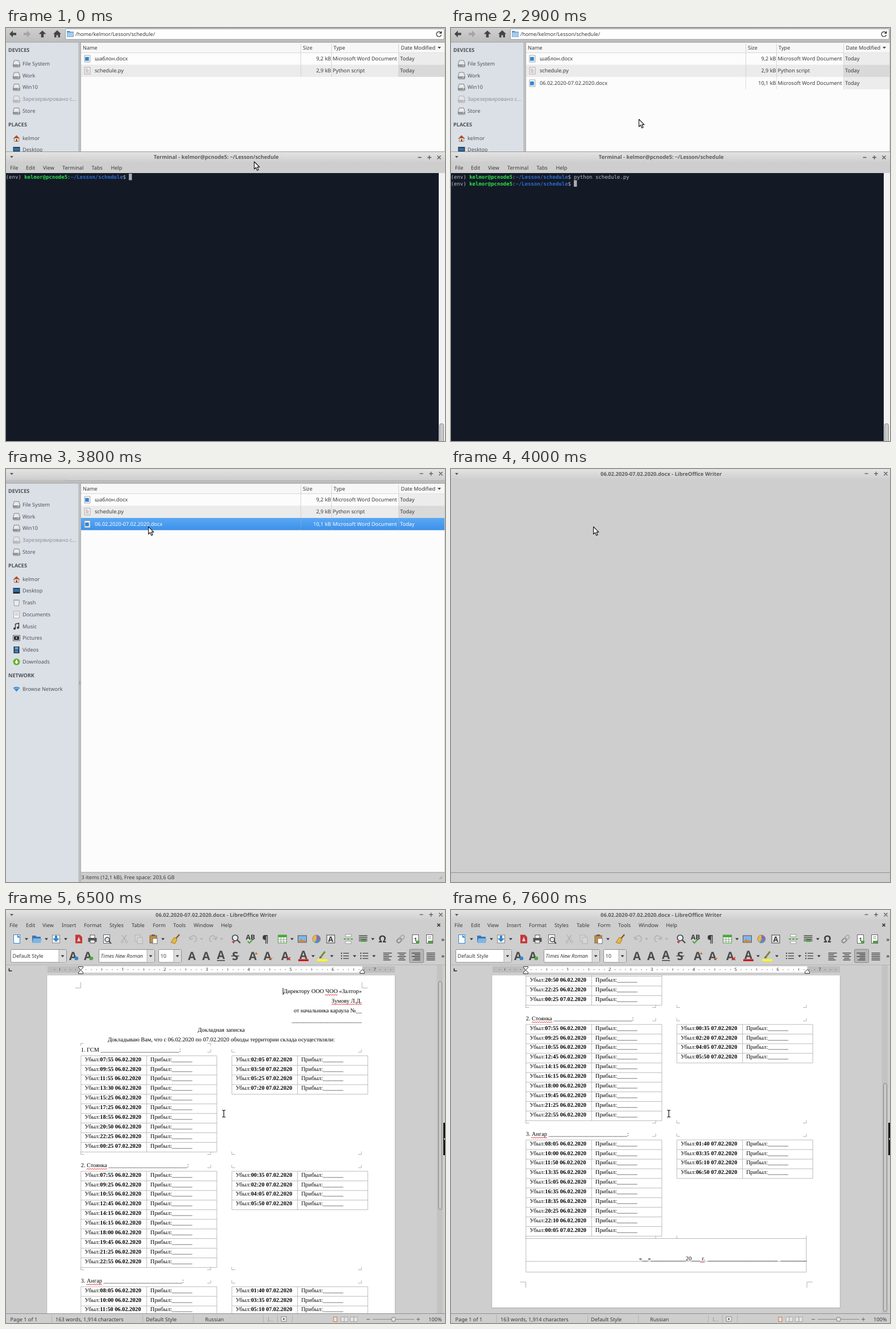
These frames come from a looping animation (772x726 px, 8000 ms). An HTML page:

```html
<!DOCTYPE html>
<html lang="en">
<head>
<meta charset="utf-8">
<title>Schedule script run</title>
<style>
html, body { margin: 0; width: 772px; height: 726px; overflow: hidden; background: #cecece; }
svg { display: block; }
text { font: 9.15px "Noto Sans", "Open Sans", sans-serif; fill: #3a3a3a; white-space: pre; text-rendering: geometricPrecision; }
.b { font-weight: 700; }
.title { font-weight: 700; font-size: 9.25px; fill: #5c5c5c; }
.side { fill: #505257; }
.head { font-weight: 700; fill: #4c4f54; }
.dim { fill: #8d9095; }
.mono { font: 9px "DejaVu Sans Mono", monospace; fill: #b9bcc0; }
.user { font-weight: 700; fill: #2fe04a; }
.dir { font-weight: 700; fill: #2f6ccd; }
.doc text { font: 10.26px "Liberation Serif", "Times New Roman", serif; fill: #000; }
.num { font-size: 7.6px; fill: #333; }
.letter { font-size: 20px; font-weight: 700; fill: #4a4a4a; }
</style>
</head>
<body>
<svg id="stage" width="772" height="726" viewBox="0 0 772 726"></svg>
<script>
const DARK = '#4a4a4a', PALE = '#b0b0b0', BLUE = '#2f86d6', GREEN = '#4aa83c';
const USER = 'kelmor', HOST = 'pcnode5', DIR = 'Lesson/schedule';
const COMMAND = 'python schedule.py ', CELL = 5.418, PROMPT_END = 216;

const text = (x, y, s, a = '') => `<text x="${x}" y="${y}" ${a}>${s}</text>`;
const rect = (x, y, w, h, fill, a = '') => `<rect x="${x}" y="${y}" width="${w}" height="${h}" fill="${fill}" ${a}/>`;
const path = (d, fill = DARK, a = '') => `<path d="${d}" fill="${fill}" ${a}/>`;
const line = (d, stroke = DARK, w = 1, a = '') => `<path d="${d}" fill="none" stroke="${stroke}" stroke-width="${w}" ${a}/>`;
const circle = (x, y, r, fill, a = '') => `<circle cx="${x}" cy="${y}" r="${r}" fill="${fill}" ${a}/>`;
const group = (id, s, a = '') => `<g id="${id}" ${a}>${s}</g>`;
const move = (x, y, s) => `<g transform="translate(${x} ${y})">${s}</g>`;
const range = n => [...Array(n).keys()];
const END = 'text-anchor="end"', MID = 'text-anchor="middle"';
const blanks = n => '_'.repeat(n);
const drop = (x, y, c = '#333') => path(`M${x - 3} ${y - 1.5}h6l-3 3.5z`, c);

function titleBar(y, label, id) {
  return rect(0, y, 772, 19, 'url(#bar)') + drop(10, y + 8.5, '#555') +
    group(id, text(369.7, y + 12, label, `class="title" ${MID}`));
}
const buttons = (x, y) => line(`M${x - 3} ${y}h6M${x + 13.5} ${y}h7m-3.5-3.5v7M${x + 31} ${y - 3}l6 6m0-6l-6 6`, '#555', 1.3);

// ---------- file manager ----------
const disk = opacity => `<g opacity="${opacity}">` +
  path('M-4-5.5h8l2 7v3a1.5 1.5 0 0 1-1.5 1.5h-9a1.5 1.5 0 0 1-1.5-1.5v-3z', '#e9e9e9', 'stroke="#777" stroke-width=".9"') +
  rect(-5.5, 1.5, 11, 3.5, '#8b8f94') + rect(2, 2.6, 2.5, 1, '#dff0c8') + '</g>';
const paper = path('M-5-6h10v12h-10z', '#f4f4f4', 'stroke="#999" stroke-width=".8"');
const placeIcons = {
  home: path('M-6 1l6-6 6 6z', '#b5472c') + rect(-4, 0, 8, 6, '#efe6d8', 'stroke="#8a5a3c" stroke-width=".7"') + rect(-1.2, 2, 2.6, 4, '#7c4a2c'),
  desk: rect(-6, -5, 12, 10, '#23303f') + rect(-5, -3.5, 10, 5.5, '#2f6ea8'),
  trash: path('M-5-4.5h10l-1.2 10h-7.6z', '#ececec', 'stroke="#888" stroke-width=".8"') + rect(-5.5, -5.5, 11, 2, '#aaa'),
  docs: paper + line('M-3-3h6m-6 2h6m-6 2h6', '#aaa', .8),
  music: line('M-2 4v-8l6-1.5v8', '#333', 1.4) + circle(-3.5, 4, 2, '#333') + circle(2.6, 2.6, 2, '#333'),
  pics: rect(-6, -4.5, 12, 9.5, '#e8e8e8', 'stroke="#444" stroke-width=".8"') + rect(-4.5, -3, 9, 6.5, '#222') + circle(0, 0, 1.6, '#bbb'),
  video: rect(-5, -6, 10, 12, '#2b3440') + rect(-3, -5, 6, 4.5, '#58a4e6') + rect(-3, .5, 6, 4.5, '#3c82c4'),
  down: circle(0, 0, 6, '#62b32d') + path('M-1.3-3.5h2.6v3.5h2.2l-3.5 3.7-3.5-3.7h2.2z', '#fff'),
  net: path('M-6-1.5a9 9 0 0 1 12 0l-6 6.5z', '#3d8fd6') + line('M-4 .2a6 6 0 0 1 8 0', '#dbe0e6', .8)
};
const places = [
  [62.5, 'File System', disk(1)], [83.5, 'Work', disk(1)], [104, 'Win10', disk(1)],
  [125, 'Зарезервировано с...', disk(.5), 'dim'], [146, 'Store', disk(1)],
  [193.5, USER, placeIcons.home], [214, 'Desktop', placeIcons.desk], [235, 'Trash', placeIcons.trash],
  [256, 'Documents', placeIcons.docs], [276.5, 'Music', placeIcons.music], [297, 'Pictures', placeIcons.pics],
  [318, 'Videos', placeIcons.video], [339, 'Downloads', placeIcons.down], [386.5, 'Browse Network', placeIcons.net]
];

function fileRow(y, name, size, type, word) {
  const icon = paper + (word ? rect(-3.8, -3, 6.6, 6.6, BLUE) : line('M-3-3h4m-4 2h6m-6 2h5m-5 2h6', '#b48a8a', .8));
  return move(143, y, icon) + text(156, y + 3.2, name) + text(571.5, y + 3.2, size, END) +
    text(574.5, y + 3.2, type) + text(693, y + 3.2, 'Today');
}

function fileManager() {
  return rect(0, 0, 772, 726, '#cecece') + rect(0, 0, 772, 25, 'url(#tools)') +
    path('M6 10.5l6-6v4h6v4h-6v4z', '#444') + path('M43 10.5l-6-6v4h-6v4h6v4z', '#a3a3a3') +
    path('M64 4.5l6.5 6h-4.2v6h-4.6v-6h-4.2z', '#444') + path('M90 4l7 6.5h-2v6h-3.5v-4h-3v4h-3.5v-6h-2z', '#444') +
    rect(104.5, 1.5, 666, 18.5, '#fff', 'rx="2" stroke="#9a9a9a"') +
    path('M107 5h5l1 1.5h6v9.5h-12z', '#5d9bd0') + rect(107.5, 8, 11, 7.5, '#a8cbe8') +
    text(122, 13.7, `/home/${USER}/${DIR}/`) +
    line('M765 8.5a4.3 4.3 0 1 0 .5 3.5', '#444', 1.4) + path('M766.5 5v5h-5z', '#444') +
    rect(0, 25, 128, 701, '#dbe0e6') + rect(0, 24.5, 772, 1, '#a4a4a4') + rect(128, 25, 3.5, 701, '#bfc1c4') +
    line('M128 25v701M131.5 25v701', '#a9a9a9', .8) + line('M128.5 374h2.5m-2.5 2h2.5m-2.5 2h2.5', '#777', .6) +
    text(4, 42, 'DEVICES', 'class="head"') + text(4, 173, 'PLACES', 'class="head"') + text(4, 366.2, 'NETWORK', 'class="head"') +
    places.map(([y, s, icon, c = 'side']) => move(18.5, y, icon) + text(29, y + 3.4, s, `class="${c}"`)).join('') +
    rect(132, 26, 639, 683, '#fcfcfc') + rect(132, 26, 639, 17, '#f7f7f7') + rect(132, 43, 639, .8, '#d2d2d2') +
    text(135, 37.5, 'Name') + text(522, 37.5, 'Size') + text(576, 37.5, 'Type') + text(694.5, 37.5, 'Date Modified') + drop(762, 34.5, '#444') +
    rect(691, 43.5, 80, 21, '#ececec') + rect(132, 64.5, 559, 21.5, '#ebebeb') + rect(691, 64.5, 80, 21.5, '#d9d9d9') +
    line('M518.5 28v58M572.5 28v58M690.5 28v58', '#d0d0d0', .9) +
    fileRow(54, 'шаблон.docx', '9,2 kB', 'Microsoft Word Document', true) +
    fileRow(75, 'schedule.py', '2,9 kB', 'Python script') +
    group('newFile', rect(691, 86, 80, 21.5, '#ececec') +
      group('selection', rect(132, 86, 639, 21.5, 'url(#sel)')) +
      line('M518.5 86v21.5M572.5 86v21.5M690.5 86v21.5', '#9fb4c8', .4) +
      fileRow(97, '06.02.2020-07.02.2020.docx', '10,1 kB', 'Microsoft Word Document', true)) +
    rect(132, 709, 640, 17, '#cecece') + rect(132, 708.5, 640, 1, '#9f9f9f') +
    text(132.5, 721.2, '3 items (12,1 kB), Free space: 203,6 GB') +
    line('M762 721l5-5m-2.5 5l2.5-2.5', '#888', .9);
}

// ---------- terminal ----------
const prompt = `(env) <tspan class="user">${USER}@${HOST}</tspan>:<tspan class="dir">~/${DIR}</tspan>$ `;

function terminal() {
  const menu = [[7, 'File'], [35, 'Edit'], [65, 'View'], [99, 'Terminal'], [150.5, 'Tabs'], [184.5, 'Help']];
  return rect(0, 217, 772, 509, '#cecece') + titleBar(218, `Terminal - ${USER}@${HOST}: ~/${DIR}`, 'termTitle') + buttons(727.5, 227.5) +
    rect(0, 217, 772, 1, '#989898') + menu.map(([x, s]) => text(x, 249, s)).join('') +
    rect(0, 255, 761, 471, '#131a26') + rect(761, 255, 11, 471, '#f2f2f2') +
    rect(762.5, 695.5, 7, 40, '#c9c9c9', 'rx="3" stroke="#8a8a8a"') +
    text(-.3, 265, prompt, 'class="mono"') + text(PROMPT_END, 265, '', 'class="mono" id="typed"') +
    text(-.3, 276.5, prompt, 'class="mono" id="prompt2"') + rect(0, 256, 5.4, 11.5, '#a9abae', 'id="block"');
}

// ---------- word processor chrome ----------
const letter = (x, y, s, a = '') => text(x, y, s, `${MID} class="letter" ${a}`);
const sign = (y, s, size) => text(0, y, s, `${MID} style="font-size:${size}px;font-weight:700"`);
const bars = (x, y, widths, shift = 0) => widths.map((w, i) => rect(x - 7.5 + (15 - w) * shift, y - 5.5 + i * 3, w, 1.4, '#444')).join('');
const page = (fill = '#fff', edge = '#666') => rect(-5.5, -7.5, 11, 15, fill, `stroke="${edge}"`);

function toolbarTop() {
  const icons = [
    [19, page('#fff', BLUE) + path('M1-7.5l5 5h-5z', BLUE)],
    [54, path('M-8-6h6l2 2h7v10h-15z', '#3a78b5') + path('M-8 7l2-8h15l-2 8z', '#7fb5e6')],
    [88, rect(-6.5, -7, 13, 14, '#eee', 'stroke="#888"') + path('M-2-6h4v5h4l-6 6-6-6h4z', BLUE)],
    [128, path('M-6-7.5h8l4 4v11h-12z', '#c3383b') + path('M-3 4l3-8 3 8z', '#f0d0d0')],
    [152, rect(-4, -7, 8, 6, '#fff', 'stroke="#555"') + rect(-7.5, -2, 15, 7, '#555') + rect(-4, 2, 8, 5, '#fff', 'stroke="#555"')],
    [177, page() + circle(1, 1, 4, '#d9e8f4', 'stroke="#444" stroke-width="1.5"') + line('M4 4l4 4', DARK, 2)],
    [208, line('M-4-7l7 10m1-10l-7 10', PALE, 1.4) + circle(-4, 5, 2, 'none', `stroke="${PALE}"`) + circle(4, 5, 2, 'none', `stroke="${PALE}"`)],
    [233, rect(-6, -7, 9, 11, '#d6d6d6', `stroke="${PALE}"`) + rect(-2, -3, 9, 11, '#d6d6d6', `stroke="${PALE}"`)],
    [260, rect(-7, -6, 12, 13, '#c58c45', 'stroke="#7a5a30"') + rect(-2, -1, 8, 9, '#fff', 'stroke="#777"') + rect(-4, -8, 6, 3, '#666')],
    [298, line('M7-8l-6 7', '#8a5a20', 2.5) + path('M-2-3l5 4-4 7-7-2z', '#e8b93c', 'stroke="#a87a1c"')],
    [329, line('M-5 0a5.5 5.5 0 1 1 7 5M-7-4l2 5 5-2', PALE, 1.7)],
    [364, line('M5 0a5.5 5.5 0 1 0-7 5M7-4l-2 5-5-2', PALE, 1.7)],
    [404, circle(-1, -2, 5, '#dfe9f2', 'stroke="#444" stroke-width="1.7"') + line('M3 2l5 5', '#444', 2.2) + path('M-7 4h6l-3 4z', '#c33')],
    [430, sign(1, 'AB', 12) + line('M-5 4l3 3 6-6', GREEN, 2)],
    [456, sign(6, '¶', 17)],
    [486, rect(-7.5, -7, 15, 14, '#fff', `stroke="${GREEN}"`) + rect(-7.5, -7, 15, 4, GREEN) + line('M-2.5-3v10M2.5-3v10M-7 .5h14M-7 4h14', '#888', .8)],
    [521, rect(-7.5, -6, 15, 12, '#7bb6ec', 'stroke="#555"') + path('M-7 5.5l5-6 4 4 2-2 3 4z', '#d98536')],
    [546, circle(0, 0, 7, '#e6b844', 'stroke="#777" stroke-width=".7"') + path('M0 0v-7a7 7 0 0 1 6 10z', '#8b68b5') + path('M0 0l6 3a7 7 0 0 1-9 3.5z', '#4a8fcd')],
    [571, rect(-7, -7, 14, 14, '#e8e8e8', 'stroke="#444"') + sign(5, 'A', 13)],
    [602, path('M-5-8h10v4h-10zM-5 4h10v4h-10z', '#fff', 'stroke="#888" stroke-width=".8"') + line('M-8 0h16', GREEN, 2, 'stroke-dasharray="4 2"')],
    [628, bars(0, -1, [15, 15, 15, 15]) + rect(-3, 1, 8, 4, GREEN)],
    [662, sign(6, 'Ω', 17)],
    [694, '<g transform="rotate(-45)">' + rect(-8, -3, 9, 6, 'none', 'rx="3" stroke="#888" stroke-width="1.8"') + rect(-1, -3, 9, 6, 'none', 'rx="3" stroke="#aaa" stroke-width="1.8"') + '</g>'],
    [720, page() + sign(4, '1', 9) + rect(1, 3, 6, 4, GREEN)],
    [745, page() + line('M-3-4h6m-6 3h6', '#888') + rect(-3, 3, 8, 4, GREEN)]
  ];
  return icons.map(([x, s]) => move(x, 51, s)).join('') +
    [36, 71, 105, 276, 503, 645].map(x => drop(x, 51)).join('') + drop(344, 51, PALE) + drop(379, 51, PALE);
}

function combo(x, w, label, style = '') {
  return rect(x + .5, 69.5, w, 22.5, '#fff', 'rx="2" stroke="#8d8d8d"') + rect(x + w - 13, 70, 13, 21.5, '#dcdcdc') +
    line(`M${x + w - 13} 70v21.5`, '#aaa') + drop(x + w - 6.5, 81) + text(x + 3.5, 84, label, `style="${style}"`);
}

function toolbarText() {
  const tag = (x, c) => circle(x, 85, 3.2, c);
  const list = x => range(3).map(i => rect(x - 7, 75 + i * 4.6, 2, 2, '#444') + rect(x - 3, 75.4 + i * 4.6, 10, 1.3, '#444')).join('') + drop(x + 17, 81);
  return combo(8, 98, 'Default Style') + combo(163, 98, 'Times New Roman', 'font-style:italic') + combo(268, 40, '10') +
    letter(118, 87.5, 'A') + tag(124, BLUE) + letter(144, 87.5, 'A') + tag(150, GREEN) +
    letter(327, 87.5, 'A') + letter(352, 87.5, 'A', 'font-style="italic"') + letter(378, 86, 'A') + rect(371, 88, 14, 1.5, '#444') +
    letter(403, 87.5, 'S') + rect(396, 80, 14, 1.4, '#444') +
    letter(434, 87.5, 'A') + path('M437 78l3-4 3 4z', '#d9712c') + letter(460, 87.5, 'A') + path('M463 84h6l-3 4z', '#d9712c') +
    letter(491, 87.5, 'A') + line('M494 83l6 5m0-5l-6 5', '#c33', 1.7) +
    letter(523, 85.5, 'A') + rect(514, 86.5, 18, 3.5, '#d01818') + drop(540, 81) +
    line('M561 73l-7 9', '#7a8a3a', 3) + path('M552 81l4 3-5 1z', '#555') + rect(547, 86.5, 18, 3.5, '#ffff00') + drop(573, 81) +
    list(596) + list(630) +
    rect(709.5, 69, 25, 23.5, '#b4b4b4', 'rx="2" stroke="#8c8c8c"') +
    bars(671, 80.5, [15, 10, 15, 10, 13]) + bars(696, 80.5, [15, 9, 15, 9, 13], .5) +
    bars(721, 80.5, [15, 10, 15, 10, 13], 1) + bars(747, 80.5, [15, 15, 15, 15, 15]);
}

// ticks every 1/8 inch, a number on each whole inch
function ruler(origin, from, to) {
  const inch = 73.85;
  let s = '';
  for (let i = Math.ceil((from - origin) * 8 / inch); origin + i * inch / 8 < to; i++) {
    const x = origin + i * inch / 8;
    if (i % 8) s += rect(x - .4, i % 4 ? 104 : 102.5, .9, i % 4 ? 1.5 : 4, '#555');
    else if (i) s += text(x, 107.3, Math.abs(i / 8), `class="num" ${MID}`);
  }
  return s;
}

function rulers() {
  const hourglass = 'M127.5 99.5h8v2l-4 4 4 4v2.5h-8v-2.5l4-4-4-4z';
  return line('M5.5 102.5v4.5h5', '#222', 1.6) +
    group('ruler1', rect(15, 99, 742, 11, '#fff') + ruler(-.4, 17, 757)) +
    group('ruler2', rect(73, 99, 611, 11, '#bdbdbd') + rect(131.5, 99, 495, 11, '#fff') + ruler(131.5, 77, 681) +
      path(hourglass, '#eee', 'stroke="#222" stroke-width=".9"') + path('M622.5 111.5v-3l4-4 4 4v3z', '#eee', 'stroke="#222" stroke-width=".9"'));
}

function statusBar() {
  const sheet = (x, c) => rect(x - 3, 715.5, 6, 8, '#e4e4e4', `stroke="${c}" stroke-width=".9"`);
  return rect(0, 709, 772, 17, '#cecece') + rect(0, 709, 772, 1, '#8f8f8f') +
    text(7.5, 722.5, 'Page 1 of 1') + text(87, 722.5, '163 words, 1,914 characters') + text(246, 722.5, 'Default Style') + text(350, 722.5, 'Russian') +
    line('M80.5 712v13M240.5 712v13M329.5 712v13M452.5 712v13M477.5 712v13M503.5 712v13', '#b2b2b2') +
    text(460, 722.5, 'I...', 'class="dim"') + rect(484, 715, 9, 8, '#eee', 'stroke="#777" stroke-width=".8"') + circle(488.5, 719, 1.6, '#555') +
    sheet(579, '#d07030') + [592, 598, 608.5, 615].map(x => sheet(x, '#a4a4a4')).join('') +
    line('M634 719.5h6M722 719.5h6m-3-3v6', '#666') + line('M645 719.5h73M682 716v7', '#8c8c8c') +
    circle(681.5, 719.5, 3.7, '#e4e4e4', 'stroke="#777"') + text(743, 722.5, '100%');
}

// ---------- document ----------
const squiggle = (x1, x2, y) => line(`M${x1} ${y}` + range(Math.round((x2 - x1) / 2)).map(i => `l2 ${i % 2 ? 1.6 : -1.6}`).join(''), '#e02020', .9);
const corner = (x, y, dx, dy) => `M${x + dx} ${y}H${x}V${y + dy}`;

function grid(x, y, w, split, times, day) {
  const h = 16.92, rows = times.length, tall = rows * h;
  const lines = range(rows + 1).map(i => `M${x} ${y + i * h}h${w}`).join('') +
    [0, split, w].map(dx => `M${x + dx} ${y}v${tall}`).join('');
  return line(lines, '#b4b4b4', .9) + times.map((t, i) => {
    const date = t < day ? '07.02.2020' : '06.02.2020', base = y + 9.4 + i * h;
    return text(x + 6.8, base, `Убыл:<tspan class="b">${t} ${date}</tspan>`) + text(x + 122, base, 'Прибыл:' + blanks(7));
  }).join('');
}

function section(i, name, left, right) {
  const dy = i * 203, top = 287 + dy, low = 466.5 + dy;
  const marks = corner(360, top, -6, -5) + corner(397, top, 6, -5) + corner(625, top, -6, -5) +
    [131.5, 397].map(x => corner(x, low, 6, -5)).join('') + [360, 625].map(x => corner(x, low, -6, -5)).join('');
  return line(marks, '#a9a9a9', .9) + text(131.8, 285.8 + dy, `${i + 1}. ${name} ${blanks(27)}:`) +
    grid(131.8, 293.2 + dy, 239, 115.5, left.split(' '), '07:00') + grid(397.2, 293.2 + dy, 239, 115.5, right.split(' '), '23:59');
}

function documentPage() {
  const right = (y, s) => text(625.6, y, s, END), mid = (y, s) => text(378.7, y, s, MID);
  const crop = corner(131.5, 174, -10, -10) + corner(626, 174, 10, -10) + corner(131.5, 949, -10, 10) + corner(626, 949, 10, 10) +
    corner(131.5, 271.5, 5, 4) + corner(360, 271.5, -6, 4);
  return rect(71, 127.7, 614.5, 868, '#bebebe') + rect(72.3, 128.7, 611.5, 865, '#fff') + line(crop, '#a9a9a9', .9) +
    right(183.3, 'Директору ООО ЧОО «Залтор»') + right(200.2, 'Зумову Л.Д.') + right(217.1, 'от начальника караула №__') + right(234, blanks(24)) +
    rect(486.7, 174, 1, 12, '#000') + mid(251, 'Докладная записка') +
    mid(268, 'Докладываю Вам, что с 06.02.2020 по 07.02.2020 обходы территории склада осуществляли:') +
    section(0, 'ГСМ', '07:55 09:55 11:55 13:30 15:25 17:25 18:55 20:50 22:25 00:25', '02:05 03:50 05:25 07:20') +
    section(1, 'Стоянка', '07:55 09:25 10:55 12:45 14:15 16:15 18:00 19:45 21:25 22:55', '00:35 02:20 04:05 05:50') +
    section(2, 'Ангар', '08:05 10:00 11:50 13:35 15:05 16:35 18:35 20:25 22:10 00:05', '01:40 03:35 05:10 06:50') +
    line('M131.8 872.5h493v59h-493zM131.8 912.7h493', '#b4b4b4', .9) +
    text(626, 911, `«__»${blanks(12)}20___ г.  ${blanks(24)}  ${blanks(9)}`, END) +
    group('spelling', squiggle(561, 583, 187) + squiggle(572, 625, 203.5) + squiggle(142, 178, 493) + squiggle(141, 168, 696) + squiggle(438, 446, 915));
}

function writer() {
  const menu = [[6, 'File'], [35, 'Edit'], [64, 'View'], [98, 'Insert'], [137, 'Format'], [182, 'Styles'], [221, 'Table'], [258, 'Form'], [294, 'Tools'], [330, 'Window'], [378, 'Help']];
  return menu.map(([x, s]) => text(x, 30, s)).join('') + line('M758.5 24l5 5m0-5l-5 5', '#333', 1.6) +
    toolbarTop() + toolbarText() + text(765.5, 55, '»', 'class="b"') + text(765.5, 84, '»', 'class="b"') +
    rect(0, 96, 772, 1, '#b5b5b5') + rulers() +
    `<g clip-path="url(#view)">${group('sheet', documentPage(), 'class="doc"')}</g>` +
    rect(757.5, 97, 10.5, 612, '#c3c3c3') + rect(760.5, 100, 6, 401, '#c9c9c9', 'id="thumb" rx="3" stroke="#858585"') +
    rect(769, 374, 3, 57, '#151515') + path('M772 400l-2 2.5 2 2.5z', '#ddd') + statusBar();
}

// ---------- stage ----------
const stage = document.getElementById('stage');
const fade = (id, a, b) => `<linearGradient id="${id}" x2="0" y2="1"><stop stop-color="${a}"/><stop offset="1" stop-color="${b}"/></linearGradient>`;
const beam = 'M-3-6h2l1 1 1-1h2M0-5v10M-3 6h2l1-1 1 1h2';
stage.innerHTML =
  `<defs>${fade('bar', '#e3e3e3', '#cecece')}${fade('tools', '#cfcfcf', '#bdbdbd')}${fade('sel', '#5ba8f4', '#3b90e8')}` +
  `<clipPath id="view">${rect(0, 115, 757, 594, '#000')}</clipPath></defs>` +
  group('files', fileManager()) + group('term', terminal()) +
  group('blank', rect(0, 0, 772, 726, '#cecece') + rect(0, 709, 772, 1, '#8f8f8f')) +
  group('frame', titleBar(0, '06.02.2020-07.02.2020.docx - LibreOffice Writer', 'docTitle') + buttons(730.5, 8.2)) +
  group('writer', writer()) +
  group('arrow', path('M.5.5v13l3-2.8 2.2 5 2.3-1-2.2-4.8h4z', '#fff', 'stroke="#111" stroke-width="1.1" stroke-linejoin="round"')) +
  group('beam', line(beam, '#fff', 2.6) + line(beam, '#111', 1.2));

const el = {};
stage.querySelectorAll('[id]').forEach(n => el[n.id] = n);
el.newFile.querySelectorAll('text').forEach(n => n.style.fill = 'var(--ink)');

const LOOP = 8000;
const typing = [[0, 0], [300, 1], [400, 2], [500, 3], [600, 4], [700, 5], [800, 6], [1000, 7], [1500, 8], [1600, 9], [1700, 19]];
const pointer = [[0, 436, 234.5], [2900, 330, 160], [3000, 250, 101], [5400, 320, 215], [5500, 383, 330], [5700, 383, 314], [5900, 383, 358]];
const scrolling = [[0, 0], [6500, 37], [6700, 111], [7000, 222], [7600, 295]];
const visible = {
  files: [0, 4000], term: [0, 3400], newFile: [2100, LOOP], selection: [3400, LOOP], prompt2: [2200, LOOP],
  frame: [3800, LOOP], docTitle: [4000, LOOP], blank: [4000, LOOP], writer: [5200, LOOP],
  spelling: [5500, LOOP], ruler1: [0, 5900], ruler2: [5900, LOOP], arrow: [0, 5500], beam: [5500, LOOP]
};
const at = (steps, t) => steps.findLast(s => s[0] <= t);

function draw(now) {
  const t = now % LOOP;
  for (const id in visible) el[id].style.display = t >= visible[id][0] && t < visible[id][1] ? '' : 'none';

  const typed = at(typing, t)[1];
  el.typed.textContent = COMMAND.slice(0, typed);
  el.block.setAttribute('x', t < 2000 ? PROMPT_END + typed * CELL : t < 2200 ? .5 : PROMPT_END);
  el.block.setAttribute('y', t < 2000 ? 256 : 267.5);
  el.newFile.style.setProperty('--ink', t < 3400 ? '#3a3a3a' : '#fff');

  const [, x, y] = at(pointer, t);
  el.arrow.setAttribute('transform', `translate(${x} ${y})`);
  el.beam.setAttribute('transform', `translate(${x} ${y})`);

  const scroll = at(scrolling, t)[1];
  el.sheet.setAttribute('transform', `translate(0 ${-scroll})`);
  el.thumb.setAttribute('y', 100 + scroll * .694);
}

const start = performance.now();
function tick() {
  draw(performance.now() - start);
  requestAnimationFrame(tick);
}
tick();
</script>
</body>
</html>
```
